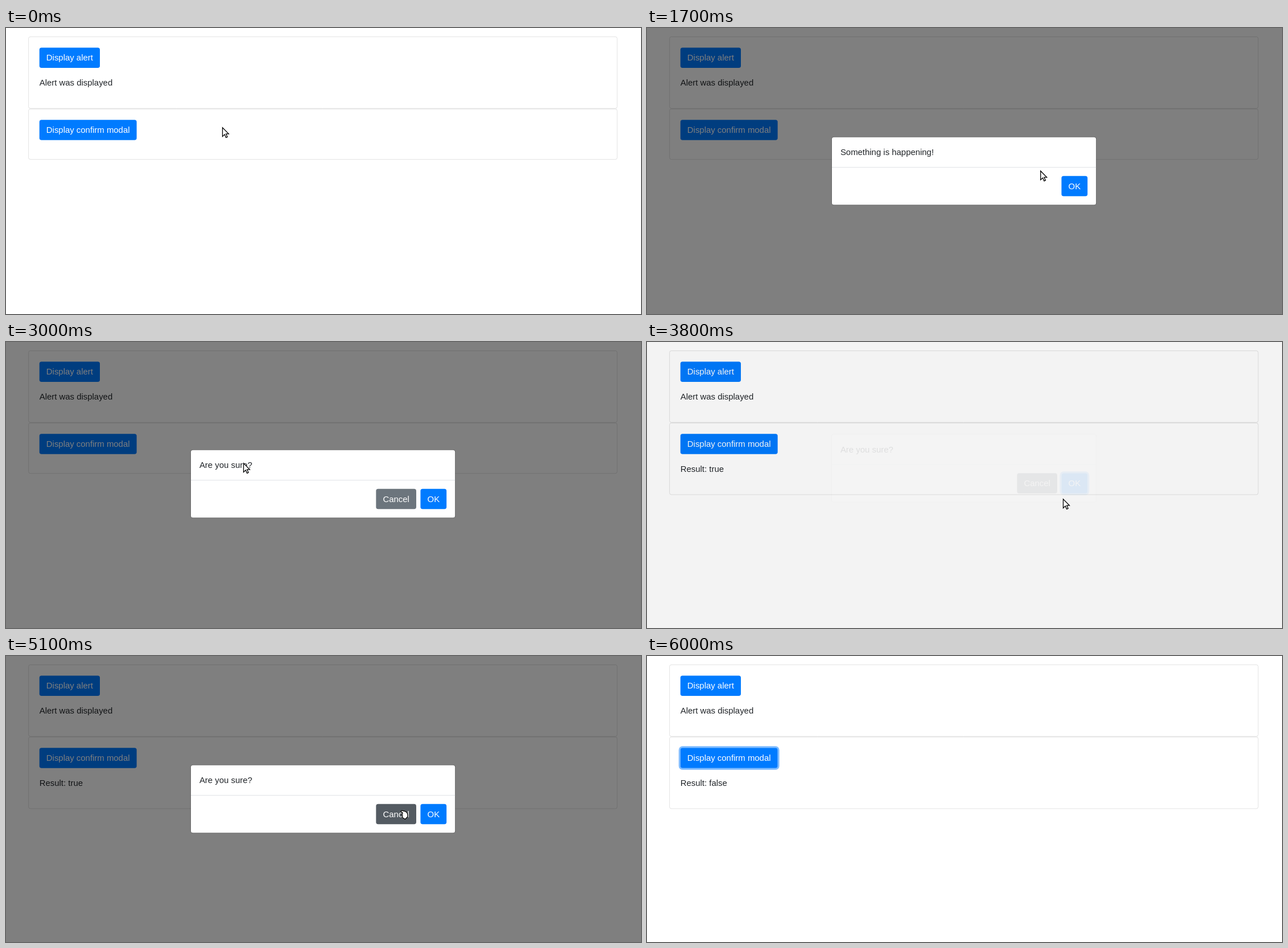
These frames come from a looping animation (1116x502 px, 6.1 s). An HTML page with a canvas:

```html
<!DOCTYPE html>
<html lang="en">
<head>
<meta charset="utf-8">
<title>Alert and confirm dialogs</title>
<style>
  html, body { margin: 0; width: 100%; height: 100%; overflow: hidden; background: #fff; }
  canvas { display: block; }
</style>
</head>
<body>
<canvas id="stage" width="1116" height="502"></canvas>
<script>
const W = 1116, H = 502, LOOP = 6100, STEP = 100;
const SCALE = 0.932; // page units to stage pixels
const FONT = '16px "Liberation Sans", Arial, sans-serif';
const INK = '#212529';
const BLUE = { base: '#007bff', hover: '#0069d9', ring: 'rgba(0,123,255,.5)' };
const GRAY = { base: '#6c757d', hover: '#545b62', ring: 'rgba(108,117,125,.5)' };

const stage = document.getElementById('stage').getContext('2d');
const layer = document.createElement('canvas');
layer.width = W;
layer.height = H;
const modalCtx = layer.getContext('2d');

const dialogs = [
  { text: 'Something is happening!', open: 1066, close: 2020, pick: 'OK' },
  { text: 'Are you sure?', open: 2749, close: 3664, pick: 'OK', cancel: true, result: 'true' },
  { text: 'Are you sure?', open: 4640, close: 5160, pick: 'Cancel', cancel: true, result: 'false' }
];
const FADE = 150, SLIDE = 300, DROP = 50;
const POINTER_GONE = 5700, REFOCUS = 6000;

// Pointer stops: time, x, y
const path = [
  [500, 380, 174], [1000, 125, 39], [1100, 123, 38], [1250, 128, 42],
  [1800, 744, 272], [2050, 740, 277], [2300, 513, 240], [2600, 192, 183],
  [2750, 186, 181], [3000, 417, 212], [3400, 738, 270], [3680, 742, 272],
  [3800, 731, 275], [3950, 690, 268], [4450, 190, 183], [4640, 183, 180],
  [5000, 690, 272], [5100, 693, 270], [5170, 688, 268], [5400, 329, 126],
  [5600, 153, 10]
];

const arrowShape = new Path2D('M.5 .8V16.4L4.2 12.9L6.7 18.4L9.1 17.3L6.7 11.9H11.4Z');
const handShape = new Path2D(
  'M1.5 3.5Q.5 1.2 3 1.3L8 2.6Q12.5 4 12.8 8.5L13 12L8.5 16.5L4.5 14' +
  'Q2.5 12.5 4 11Q2 9.8 3.6 8.2Q2 6.8 4.2 5.4Z');

const clamp = v => Math.max(0, Math.min(1, v));

// cubic-bezier(0, 0, .58, 1)
function easeOut(x) {
  let lo = 0, hi = 1;
  for (let i = 0; i < 24; i++) {
    const u = (lo + hi) / 2;
    if (1.74 * u * u * (1 - u) + u ** 3 < x) lo = u; else hi = u;
  }
  return 3 * lo * lo - 2 * lo ** 3;
}

function slope(i, axis) {
  if (i <= 0 || i >= path.length - 1) return 0;
  const rate = k => (path[k + 1][axis] - path[k][axis]) / (path[k + 1][0] - path[k][0]);
  const a = rate(i - 1), b = rate(i);
  return a * b > 0 ? 2 * a * b / (a + b) : 0;
}

function pointerAt(t) {
  const last = path.length - 1;
  if (t <= path[0][0]) return path[0].slice(1);
  if (t >= path[last][0]) return path[last].slice(1);
  const i = path.findIndex(p => p[0] > t) - 1;
  const span = path[i + 1][0] - path[i][0], u = (t - path[i][0]) / span;
  return [1, 2].map(axis => {
    const p = path[i][axis], q = path[i + 1][axis];
    const e = u * u * (3 - 2 * u);
    return p + (q - p) * e + span * u * (1 - u) *
      (slope(i, axis) * (1 - u) - slope(i + 1, axis) * u);
  });
}

function makeButton(label, x, y, colors, alignRight) {
  stage.font = FONT;
  const w = stage.measureText(label).width + 26;
  return { label, x: alignRight ? x - w : x, y, w, h: 38, colors };
}

const MODAL = { x: 347.7, y: 204.8, w: 500, h: 129 };
const right = MODAL.x + MODAL.w - 17, row = MODAL.y + 74;
const alertButton = makeButton('Display alert', 63, 37, BLUE);
const confirmButton = makeButton('Display confirm modal', 63, 173, BLUE);
const okButton = makeButton('OK', right, row, BLUE, true);
const cancelButton = makeButton('Cancel', okButton.x - 8, row, GRAY, true);

const modalButtons = d => d.cancel ? [cancelButton, okButton] : [okButton];

function hoveredAt(t) {
  const [x, y] = pointerAt(t).map(v => v / SCALE);
  const shown = dialogs.find(d => t >= d.open && t < d.close);
  const buttons = shown ? modalButtons(shown) : [alertButton, confirmButton];
  return buttons.find(b => x >= b.x && x <= b.x + b.w && y >= b.y && y <= b.y + b.h);
}

function box(ctx, x, y, w, h, r) {
  ctx.beginPath();
  ctx.roundRect(x, y, w, h, r);
}

function write(ctx, text, x, top, color) {
  ctx.font = FONT;
  ctx.fillStyle = color;
  ctx.fillText(text, x, top + 17.6);
}

function drawButton(ctx, b, hovered, focused) {
  if (focused) {
    box(ctx, b.x - 1.6, b.y - 1.6, b.w + 3.2, b.h + 3.2, 5.6);
    ctx.strokeStyle = b.colors.ring;
    ctx.lineWidth = 3.2;
    ctx.stroke();
  }
  box(ctx, b.x, b.y, b.w, b.h, 4);
  ctx.fillStyle = hovered ? b.colors.hover : b.colors.base;
  ctx.fill();
  write(ctx, b.label, b.x + 13, b.y + 7, '#fff');
}

function drawCard(y, h) {
  box(stage, 42.5, y + 0.5, 1110, h - 1, 3.5);
  stage.strokeStyle = 'rgba(0,0,0,.125)';
  stage.lineWidth = 1;
  stage.stroke();
}

function drawPage(t, hovered) {
  const result = dialogs.filter(d => d.result && t >= d.close).pop();
  drawCard(16, 136);
  drawCard(152, result ? 136 : 96);
  drawButton(stage, alertButton, hovered === alertButton);
  write(stage, 'Alert was displayed', 63, 91, INK);
  drawButton(stage, confirmButton, hovered === confirmButton, t >= REFOCUS);
  if (result) write(stage, 'Result: ' + result.result, 63, 227, INK);
}

function drawModal(d, t, hovered) {
  const closing = t >= d.close;
  const age = t - (closing ? d.close : d.open);
  const fade = clamp(age / FADE), slide = easeOut(clamp(age / SLIDE));
  const alpha = closing ? 1 - fade : fade;
  const lift = DROP * (closing ? slide : 1 - slide);

  stage.setTransform(1, 0, 0, 1, 0, 0);
  stage.fillStyle = `rgba(0,0,0,${alpha / 2})`;
  stage.fillRect(0, 0, W, H);

  const c = modalCtx, { x, y, w, h } = MODAL;
  c.setTransform(1, 0, 0, 1, 0, 0);
  c.clearRect(0, 0, W, H);
  c.setTransform(SCALE, 0, 0, SCALE, 0, -lift * SCALE);
  box(c, x + 0.5, y + 0.5, w - 1, h - 1, 4.3);
  c.strokeStyle = 'rgba(0,0,0,.2)';
  c.lineWidth = 1;
  c.stroke();
  box(c, x + 1, y + 1, w - 2, h - 2, 3.8);
  c.fillStyle = '#fff';
  c.fill();
  c.fillStyle = '#dee2e6';
  c.fillRect(x + 1, y + 57, w - 2, 1);
  write(c, d.text, x + 17, y + 17, INK);
  for (const b of modalButtons(d))
    drawButton(c, b, hovered === b, closing && b.label === d.pick);

  stage.globalAlpha = alpha;
  stage.drawImage(layer, 0, 0);
  stage.globalAlpha = 1;
}

function drawPointer(t) {
  const [x, y] = pointerAt(t);
  const shape = hoveredAt(t) ? handShape : arrowShape;
  stage.setTransform(1, 0, 0, 1, x, y);
  stage.fillStyle = '#fff';
  stage.fill(shape);
  stage.strokeStyle = '#000';
  stage.lineWidth = 1.3;
  stage.stroke(shape);
}

function draw(t) {
  const hovered = t < POINTER_GONE ? hoveredAt(t - 50) : null;
  stage.setTransform(1, 0, 0, 1, 0, 0);
  stage.fillStyle = '#fff';
  stage.fillRect(0, 0, W, H);
  stage.setTransform(SCALE, 0, 0, SCALE, 0, 0);
  drawPage(t, hovered);
  const dialog = dialogs.find(d => t >= d.open && t < d.close + FADE);
  if (dialog) drawModal(dialog, t, hovered);
  if (t < POINTER_GONE) drawPointer(t);
}

const start = performance.now();
function tick() {
  const t = (performance.now() - start) % LOOP;
  draw(Math.floor(t / STEP) * STEP);
  requestAnimationFrame(tick);
}
tick();
</script>
</body>
</html>
```
